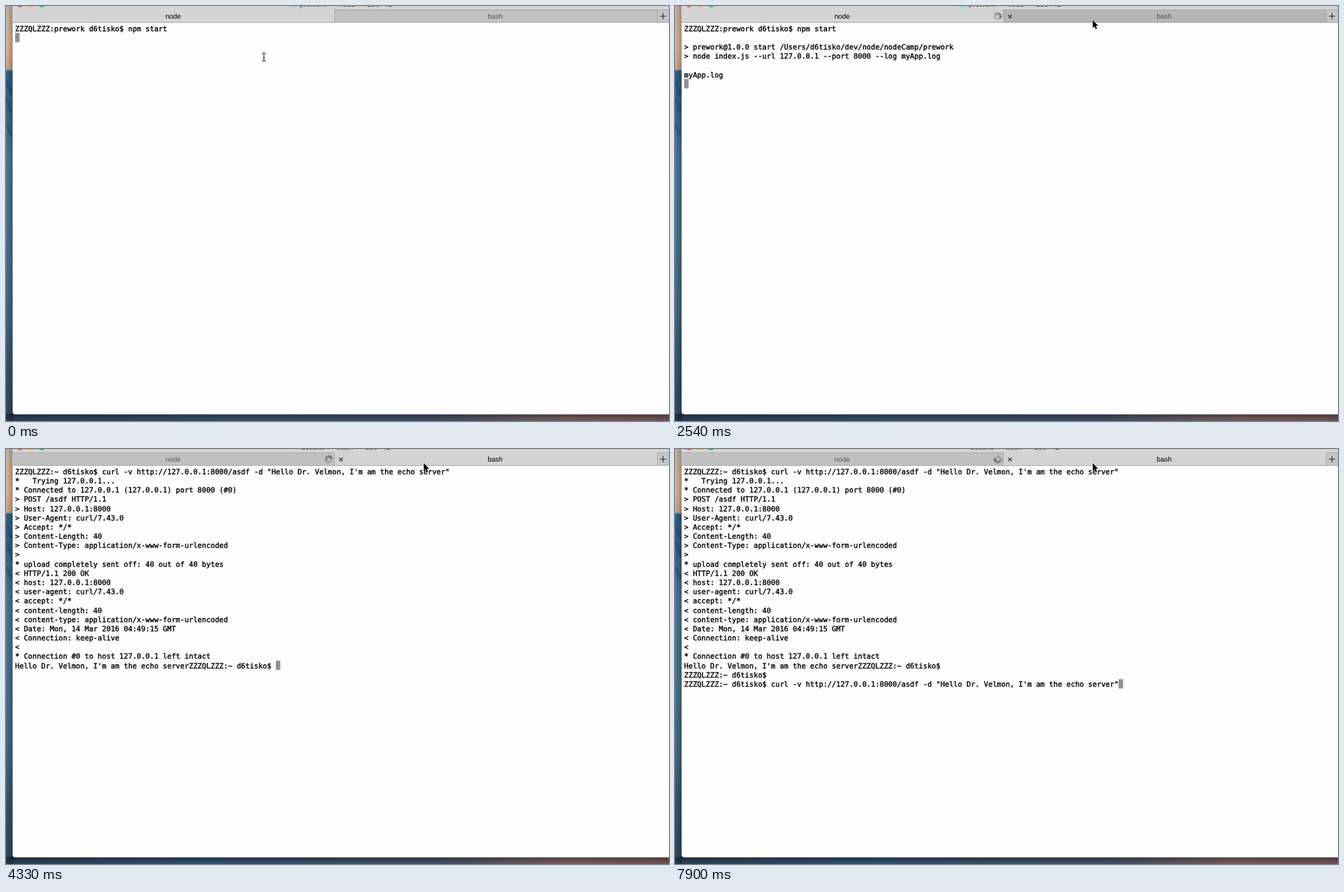
Recreate the animation shown at these times as an HTML page. Size 946 px wide and 592 px high, loop 8 s.

```html
<!DOCTYPE html>
<html lang="en">
<head>
<meta charset="utf-8">
<title>Echo server in a terminal</title>
<style>
html, body { margin: 0; width: 100%; height: 100%; overflow: hidden; background: #2b4058; }
svg { display: block; width: 946px; height: 592px; }
text { white-space: pre; text-rendering: geometricPrecision; }
.mono { font: 10.3px "DejaVu Sans Mono", monospace; font-variant-ligatures: none; stroke: #000; stroke-width: .35; }
.ui { font: 10px "Liberation Sans", Arial, sans-serif; text-anchor: middle; }
#title { font-size: 10.8px; text-anchor: start; fill: #444; }
</style>
</head>
<body>
<svg viewBox="0 0 946 592">
  <defs>
    <linearGradient id="side" x2="0" y2="1">
      <stop offset="0" stop-color="#c9b8a4"/>
      <stop offset=".1" stop-color="#dfba9b"/>
      <stop offset=".152" stop-color="#d2ab90"/>
      <stop offset=".158" stop-color="#2f6388"/>
      <stop offset=".25" stop-color="#3a6a89"/>
      <stop offset=".36" stop-color="#4d7c99"/>
      <stop offset=".55" stop-color="#4d7690"/>
      <stop offset=".75" stop-color="#426a87"/>
      <stop offset=".87" stop-color="#36546e"/>
      <stop offset="1" stop-color="#304a63"/>
    </linearGradient>
    <linearGradient id="floor">
      <stop offset="0" stop-color="#304a63"/>
      <stop offset=".3" stop-color="#3a5c7a"/>
      <stop offset=".65" stop-color="#4a5c74"/>
      <stop offset=".85" stop-color="#8c6a6b"/>
      <stop offset="1" stop-color="#815f63"/>
    </linearGradient>
    <linearGradient id="shadeSide">
      <stop offset="0" stop-opacity="0"/><stop offset="1" stop-opacity=".28"/>
    </linearGradient>
    <linearGradient id="shadeFloor" x2="0" y2="1">
      <stop offset="0" stop-opacity=".45"/><stop offset="1" stop-opacity=".1"/>
    </linearGradient>
  </defs>

  <rect width="10" height="592" fill="url(#side)"/>
  <path d="M0 108l9 20M0 132l9 22M0 168l9 18" stroke="#1d4768" stroke-width="5" opacity=".4"/>
  <rect y="582" width="946" height="10" fill="url(#floor)"/>
  <rect width="10" height="592" fill="url(#shadeSide)"/>
  <rect y="582" width="946" height="10" fill="url(#shadeFloor)"/>

  <path d="M9.5 0H946V582.4H13.5Q9.5 582.4 9.5 578.4Z" fill="#fefefe"/>
  <rect x="9.5" width="936.5" height="24" fill="#d4d4d4"/>
  <circle cx="20" cy="-3.7" r="5.6" fill="#fc5b57"/>
  <circle cx="35.7" cy="-3.7" r="5.6" fill="#fdbc40"/>
  <circle cx="51.3" cy="-3.7" r="5.6" fill="#34c84a"/>
  <rect id="icon" y="-8" height="10" rx="1"/>
  <text id="title" class="ui" y="1.3"></text>

  <rect id="idleTab" y="5" height="18.5"/>
  <path id="idleEdge" fill="none" stroke="#a9a9a9"/>
  <rect x="929" y="5" width="17" height="18.5" fill="#c5c5c5"/>
  <path d="M468.5 5V24M929.5 5V24M929 5.5H946M9.5 23.5H946" stroke="#a9a9a9" fill="none"/>
  <path d="M937.5 10V19M933 14.5H942" stroke="#333" stroke-width="1.2"/>
  <text id="nodeTab" class="ui" x="238.5" y="18">node</text>
  <text id="bashTab" class="ui" x="698" y="18">bash</text>
  <path id="close" d="M475.5 12.5l5 5m0-5l-5 5" stroke="#333" stroke-width="1.2"/>
  <g id="spinner" transform="translate(460.5 14.7)" stroke="#222" stroke-width="1.2" stroke-linecap="round"></g>

  <rect id="cursor" width="6.4" height="13.2" fill="#919191"/>
  <g id="screen" class="mono"></g>
  <rect id="scrollbar" x="941" y="562" width="6.5" height="19" rx="3" fill="#7d7d7d"/>

  <path id="beam" fill="none" stroke="#222"
        d="M-2.8 -6Q0 -6 0 -4.5Q0 -6 2.8 -6M0 -5V5M-2.8 6Q0 6 0 4.5Q0 6 2.8 6M-1.6 1H1.6"/>
  <path id="arrow" transform="translate(596 20)" d="M0 0V11.2L2.5 8.9L4.3 13L6.2 12.2L4.4 8.2H7.8Z"
        fill="#000" stroke="#fff" stroke-width=".8" paint-order="stroke"/>
</svg>
<script>
const LOOP = 8000, STEP = 149.1;
const LEFT = 13, TOP = 25.2, CHAR = 6.2, LINE = 13.18;
const SWITCH = 20, HOVER = 16, SPIN = 4;

const $ = id => document.getElementById(id);
const show = (id, on) => $(id).setAttribute('display', on ? 'inline' : 'none');
const setAll = (el, attrs) => {
  for (const key in attrs) el.setAttribute(key, attrs[key]);
};
const set = (id, attrs) => setAll($(id), attrs);
const add = (parent, tag, attrs, text = '') => {
  const el = document.createElementNS('http://www.w3.org/2000/svg', tag);
  setAll(el, attrs);
  el.textContent = text;
  parent.append(el);
  return el;
};

const user = 'd6tisko', host = 'ZZZQLZZZ';
const greeting = "Hello Dr. Velmon, I'm am the echo server";
const prompt = `${host}:~ ${user}$ `;
const curl = `${prompt}curl -v http://127.0.0.1:8000/asdf -d "${greeting}"`;

const nodeLog = `${host}:prework ${user}$ npm start

> prework@1.0.0 start /Users/${user}/dev/node/nodeCamp/prework
> node index.js --url 127.0.0.1 --port 8000 --log myApp.log

myApp.log`.split('\n');

const bashLog = `${curl}
*   Trying 127.0.0.1...
* Connected to 127.0.0.1 (127.0.0.1) port 8000 (#0)
> POST /asdf HTTP/1.1
> Host: 127.0.0.1:8000
> User-Agent: curl/7.43.0
> Accept: */*
> Content-Length: 40
> Content-Type: application/x-www-form-urlencoded
>
* upload completely sent off: 40 out of 40 bytes
< HTTP/1.1 200 OK
< host: 127.0.0.1:8000
< user-agent: curl/7.43.0
< accept: */*
< content-length: 40
< content-type: application/x-www-form-urlencoded
< Date: Mon, 14 Mar 2016 04:49:15 GMT
< Connection: keep-alive
<
* Connection #0 to host 127.0.0.1 left intact
${greeting}${prompt}
${prompt}
${curl}`.split('\n');

// Each scene: first step, lines shown, cursor column, cursor row.
const afterPrompt = prompt.length;
const scenes = [
  [0, nodeLog.slice(0, 1), 0, 1],
  [4, nodeLog.slice(0, 5), 0, 5],
  [6, nodeLog, 0, 6],
  [SWITCH, [curl], curl.length - 1, 0],
  [27, bashLog.slice(0, 22), greeting.length + afterPrompt, 21],
  [42, bashLog.slice(0, 23), afterPrompt, 22],
  [45, [...bashLog.slice(0, 23), prompt], afterPrompt, 23],
  [50, bashLog, curl.length, 23]
];

// Pointer path: step, x, y.
const path = [[0, 368, 73], [2, 368, 73], [8, 588, 30], [9, 595, 26], [11, 695, 31], [14, 695, 31], [16, 596, 26]];

const spokes = Array.from({ length: 12 }, (_, i) =>
  add($('spinner'), 'path', { d: 'M3 0H5.5', transform: `rotate(${i * 30})` }));

function pointerAt(step) {
  const i = path.findIndex(p => p[0] > step);
  if (i < 0) return path.at(-1).slice(1);
  const [s0, x0, y0] = path[i - 1], [s1, x1, y1] = path[i];
  const k = (step - s0) / (s1 - s0);
  return [x0 + (x1 - x0) * k, y0 + (y1 - y0) * k];
}

function drawTabs(step) {
  const bash = step >= SWITCH, hover = step >= HOVER;
  const x = bash ? 9.5 : 469, width = bash ? 458.5 : 460;
  set('idleTab', { x, width, fill: hover && !bash ? '#b5b5b5' : '#c1c1c1' });
  set('idleEdge', { d: `M${x} 5.5h${width}` });
  set('nodeTab', { fill: bash ? '#555' : '#000' });
  set('bashTab', { fill: bash ? '#000' : '#555' });
  set('icon', bash ? { x: 408, width: 9, fill: '#e6d3b0' } : { x: 405, width: 11, fill: '#a5d3ea' });
  set('title', { x: bash ? 421 : 419 });
  $('title').textContent = (bash ? `${user} — bash` : 'prework — node') + ' — 130×42';
  show('close', hover);
  show('scrollbar', bash && step < 27);
}

function drawScreen(step) {
  const [, lines, col, row] = scenes.findLast(s => s[0] <= step);
  $('screen').replaceChildren();
  lines.forEach((line, i) => line &&
    add($('screen'), 'text', { x: LEFT, y: TOP + LINE * i + 10.6 }, line));
  set('cursor', { x: LEFT + CHAR * col, y: TOP + LINE * row });
}

function drawSpinner(step) {
  show('spinner', step >= SPIN);
  const head = Math.round(step * STEP * 0.012 + 6.9) % 12;
  spokes.forEach((spoke, i) => {
    const age = (head - i + 12) % 12;
    spoke.setAttribute('stroke-opacity', Math.max(0.25, 0.95 - age * 0.08));
  });
}

function drawPointer(step) {
  const [x, y] = pointerAt(step);
  set('beam', { transform: `translate(${x} ${y})` });
  show('beam', step < HOVER);
  show('arrow', step >= HOVER);
}

let shown = -1;
function tick() {
  const step = Math.floor((performance.now() % LOOP + 8) / STEP);
  if (step !== shown) {
    shown = step;
    [drawTabs, drawScreen, drawSpinner, drawPointer].forEach(draw => draw(step));
  }
  requestAnimationFrame(tick);
}
tick();
</script>
</body>
</html>
```
